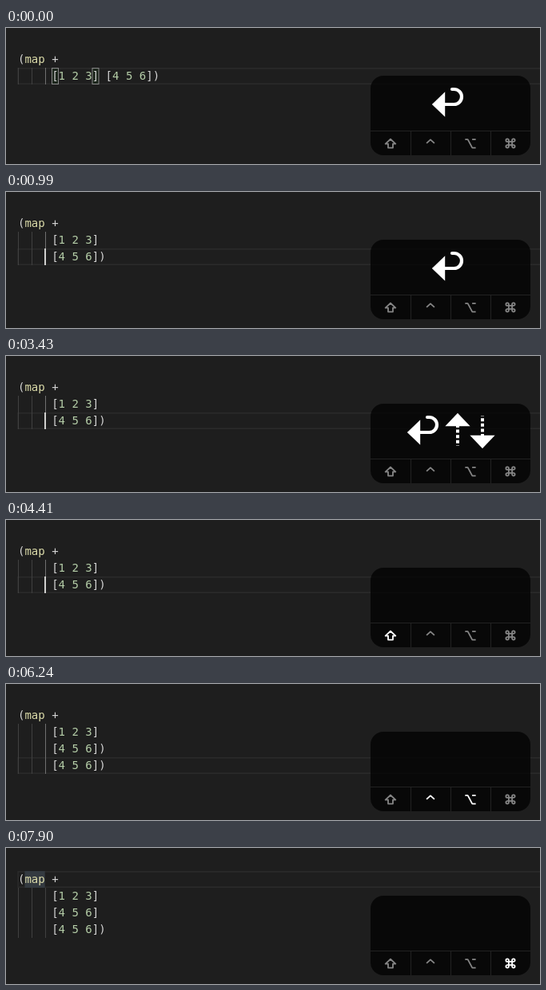
These frames come from a looping animation (668 px wide and 171 px high, 8 s). An HTML page:

```html
<!DOCTYPE html>
<html>
<head>
<meta charset="utf-8">
<style>
html, body { margin: 0; width: 100%; height: 100%; overflow: hidden; background: #1e1e1e; }
svg { display: block; }
text { font: 14px "DejaVu Sans Mono", monospace; fill: #d4d4d4; white-space: pre; }
.fn { fill: #dcdcaa; }
.num { fill: #b5cea8; }
.big { font: 600 43px Inter, sans-serif; fill: #fff; }
.line { fill: none; stroke-linejoin: round; }
</style>
</head>
<body>
<svg id="stage" width="668" height="171" viewBox="0 0 668 171">
  <defs>
    <g id="enter">
      <path class="line" d="M-9 2H4.5A9.5 9.5 0 0 0 4.5 -17H2" stroke="#fff" stroke-width="4.2" stroke-linecap="round"/>
      <path d="M-20 2L-9 -8.5V12.5Z" fill="#fff"/>
    </g>
    <g id="up">
      <path d="M0 -19L10.5 -8H-10.5Z" fill="#fff"/>
      <path d="M0 -8V19" stroke="#fff" stroke-width="4" stroke-dasharray="4 2.6"/>
    </g>
    <g id="down"><use href="#up" transform="scale(1 -1)"/></g>
    <g id="right"><use href="#up" transform="rotate(90)"/></g>
    <path id="shift" class="line" d="M0 -15L18 2H8.5V16H-8.5V2H-18Z"/>
    <path id="ctrl" class="line" d="M-14 -3L0 -16L14 -3"/>
    <path id="opt" class="line" d="M-19 -14H-9.5L6.5 16H19M6 -14H19"/>
    <path id="cmd" class="line" d="M-6 -6H6V6H-6ZM-6 -6H-11A5 5 0 1 1 -6 -11ZM6 -6V-11A5 5 0 1 1 11 -6ZM6 6H11A5 5 0 1 1 6 11ZM-6 6V11A5 5 0 1 1 -11 6Z"/>
  </defs>
  <rect width="668" height="171" fill="#1e1e1e"/>
  <rect id="current" x="15" width="670" height="19.4" fill="none" stroke="#2a2a2a" stroke-width="1.6"/>
  <rect id="word" x="23.4" y="29" width="25.3" height="21" fill="#343a40"/>
  <g id="guides"></g>
  <g id="pair" fill="#006400" fill-opacity=".1" stroke="#888">
    <rect x="57.5" y="50.5" width="8" height="20"/>
    <rect x="108" y="50.5" width="8" height="20"/>
  </g>
  <g id="code"></g>
  <rect id="caret" width="2" height="21" fill="#d0d0ce"/>
  <rect x="456" y="60" width="200" height="100" rx="16" fill="#000" fill-opacity=".75"/>
  <path d="M456 129.5H656M506.5 130V160M556.5 130V160M606.5 130V160" stroke="#222"/>
  <g id="mods" stroke-width="5.2"></g>
  <g id="keys" stroke="#fff" stroke-width="4.4"></g>
</svg>
<script>
const LOOP = 8000, CHAR = 8.43, LEFT = 15;
const $ = id => document.getElementById(id);
const row = n => 29 + 21 * n;
const use = (id, x, y, extra = "") =>
  `<use href="#${id}" transform="translate(${x} ${y})${extra}"/>`;

const HEAD = "(map +", ONE = "     [1 2 3]", TWO = "     [4 5 6]";
const text = [
  [0, [HEAD, ONE + " [4 5 6])"]],
  [910, [HEAD, ONE, TWO + ")"]],
  [4730, [HEAD, ONE, TWO + ")", TWO + ")"]],
  [6400, [HEAD, ONE, TWO, TWO + ")"]]
];

// row, column
const place = [
  [0, [1, 5]], [260, [1, 12]], [910, [2, 4]], [1740, [1, 4]], [3400, [2, 4]],
  [4730, [3, 4]], [6960, [2, 4]], [7130, [1, 4]], [7270, [0, 4]]
];

// times at which the caret goes on and off in turn
const blink = [120, 1410, 1740, 2240, 2750, 3230, 3400, 3910, 4410, 5230,
  5740, 6240, 6700, 7780];

const keys = [
  [0, "enter"], [120, ""], [260, "opt cmd right"], [400, ""], [880, "enter"],
  [1760, "enter up"], [3430, "enter up down"], [4200, ""],
  [4710, "opt shift down"], [5000, ""], [6320, "ctrl opt P"], [6460, ""],
  [6990, "up"], [7160, "up up"], [7300, "up up up"], [7900, ""]
];

const held = [
  [0, ""], [120, "opt cmd"], [400, "cmd"], [520, ""], [4200, "shift"],
  [4650, "shift opt"], [5000, ""], [6070, "ctrl"], [6130, "ctrl opt"],
  [6460, "opt"], [6520, ""], [7900, "cmd"]
];

const width = { enter: 49, up: 31, down: 31, right: 49, P: 30 };

function at(track, t) {
  let value;
  for (const [start, v] of track) if (start <= t) value = v;
  return value;
}

const paint = line => line
  .replace(/\d/g, '<tspan class="num">$&</tspan>')
  .replace("map", '<tspan class="fn">map</tspan>');

function drawKeys(names) {
  const list = names.split(" ").filter(Boolean);
  const size = k => width[k] || 42;
  let x = 556 - list.reduce((sum, k) => sum + size(k), 0) / 2;
  return list.map(k => {
    const mid = x + size(k) / 2;
    x += size(k);
    return k === "P"
      ? `<text class="big" x="${mid}" y="109" text-anchor="middle" stroke="none">P</text>`
      : use(k, mid, k === "cmd" ? 95 : 94);
  }).join("");
}

function drawMods(names) {
  const on = names.split(" ");
  return ["shift", "ctrl", "opt", "cmd"].map((k, i) =>
    `<g stroke="${on.includes(k) ? "#fff" : "#858585"}">` +
    use(k, 481 + 50 * i, k === "ctrl" ? 146 : 145, " scale(.35)") + "</g>").join("");
}

function drawGuides(count, active) {
  let out = "";
  for (let i = 0; i < 3; i++)
    out += `<rect x="${[15, 32, 49][i]}" y="50" width="1" height="${21 * (count - 1)}"
      fill="${i === 2 && active ? "#707070" : "#404040"}"/>`;
  return out;
}

const last = {};
function put(id, html) {
  if (last[id] !== html) $(id).innerHTML = last[id] = html;
}

function draw(t) {
  const lines = at(text, t), [r, c] = at(place, t);
  put("code", lines.map((s, i) =>
    `<text x="${LEFT}" y="${row(i) + 15}" xml:space="preserve">${paint(s)}</text>`).join(""));
  put("guides", drawGuides(lines.length, r > 0));
  put("keys", drawKeys(at(keys, t)));
  put("mods", drawMods(at(held, t)));
  $("current").setAttribute("y", row(r) + .8);
  $("caret").setAttribute("x", Math.floor(LEFT + c * CHAR));
  $("caret").setAttribute("y", row(r));
  const lit = blink.filter(b => b <= t).length % 2;
  $("caret").style.display = lit ? "" : "none";
  $("pair").style.display = t < 910 ? "" : "none";
  $("word").style.display = t >= 7630 ? "" : "none";
}

const begin = performance.now();
function tick() {
  draw((performance.now() - begin) % LOOP);
  requestAnimationFrame(tick);
}
draw(0);
requestAnimationFrame(tick);
</script>
</body>
</html>
```
